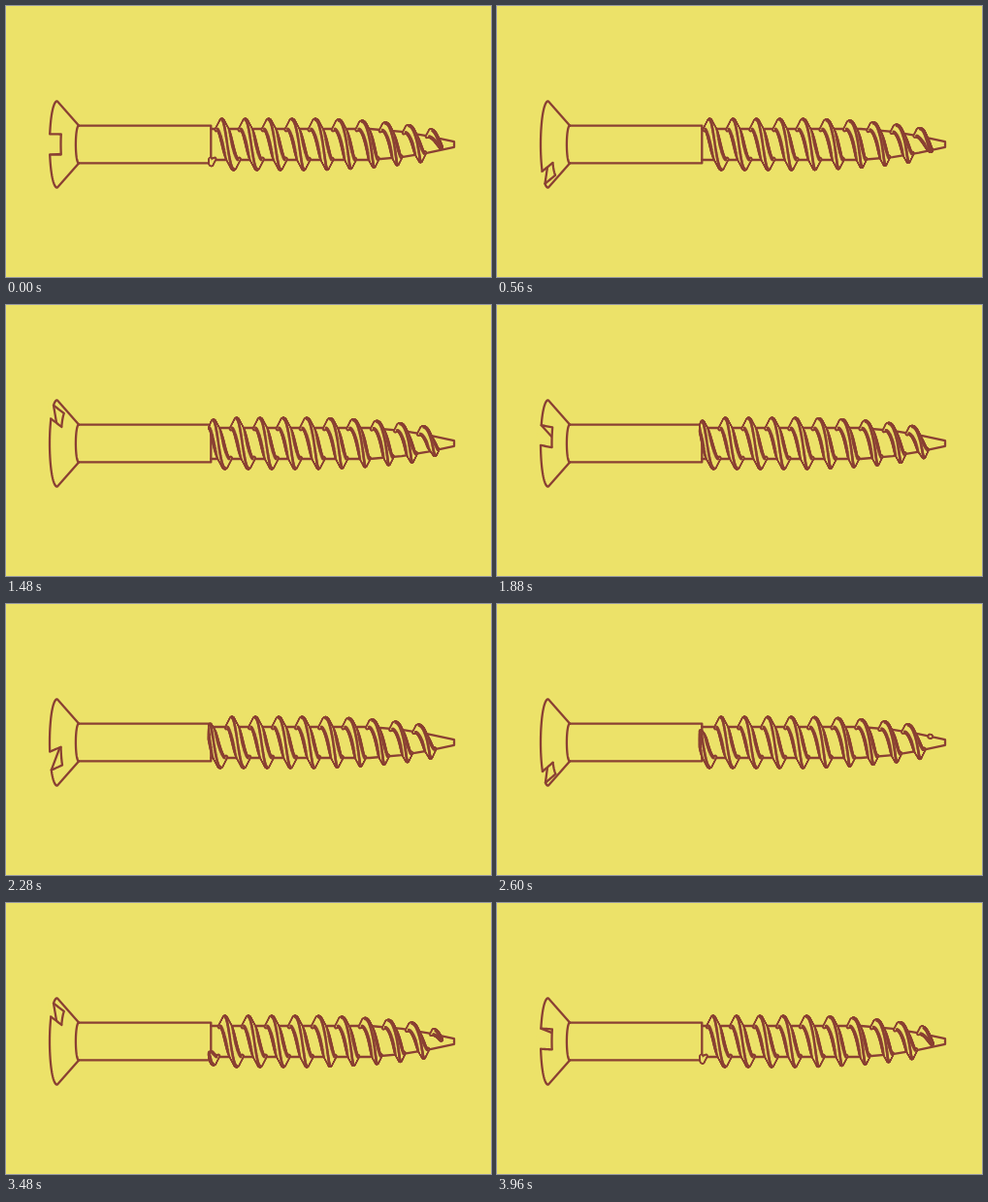
An HTML page with a canvas that plays this animation: 500x280 px, repeating every 4000 ms.

```html
<!DOCTYPE html>
<html lang="en">
<head>
<meta charset="utf-8">
<title>Turning screw</title>
<style>
  html, body { margin: 0; width: 100%; height: 100%; overflow: hidden; background: #ece269; }
  canvas { display: block; width: 500px; height: 280px; }
</style>
</head>
<body>
<canvas id="stage"></canvas>
<script>
const canvas = document.getElementById('stage');
const ctx = canvas.getContext('2d');
const ratio = window.devicePixelRatio || 1;
canvas.width = 500 * ratio;
canvas.height = 280 * ratio;
ctx.scale(ratio, ratio);
ctx.lineJoin = ctx.lineCap = 'round';

const PAPER = '#ece269', INK = '#8a4033', LINE = 2.3, THREAD_LINE = 2.6;
const LOOP = 4000, STEP = 40;
const CX = 250, CY = 143, DISTANCE = 1100;
const RIM = { x: 53, r: 44.6 }, NECK = { x: 75, r: 19.4 }, SHANK_END = 211.3;
const SLOT = { half: 10.2, floor: 62.3 };
const PITCH = 24.1, FIRST_CREST = 222.6, THREAD_START = 210.5;

// Radius along the axis, as [x, r] points.
const CORE = [[SHANK_END, 16], [375, 16], [408, 13.2], [435, 8.6], [462, 2.8]];
const CREST = [[208.5, 16], [212, 22.5], [219, 25.1], [320, 25.1], [343, 24.4],
  [367, 23.2], [391, 21.4], [415, 18.8], [438, 15.4], [448, 6], [462, 0]];

function lookup(table, x) {
  if (x <= table[0][0]) return table[0][1];
  for (let i = 1; i < table.length; i++) {
    const [x0, r0] = table[i - 1], [x1, r1] = table[i];
    if (x <= x1) return r0 + (r1 - r0) * (x - x0) / (x1 - x0);
  }
  return table[table.length - 1][1];
}

// y points down, z points at the viewer.
function project(x, y, z) {
  const s = 1 + z / DISTANCE;
  return [CX + (x - CX) * s, CY + y * s];
}

const around = (x, r, a) => project(x, -r * Math.cos(a), r * Math.sin(a));
const sample = (from, to, n, f) =>
  Array.from({ length: n + 1 }, (_, i) => f(from + (to - from) * i / n));

function trace(points, close) {
  ctx.beginPath();
  points.forEach(p => ctx.lineTo(p[0], p[1]));
  if (close) ctx.closePath();
}
function stroke(points, close = false, color = INK, width = LINE) {
  trace(points, close);
  ctx.strokeStyle = color;
  ctx.lineWidth = width;
  ctx.stroke();
}
function fill(points) {
  trace(points, true);
  ctx.fillStyle = PAPER;
  ctx.fill();
}

function drawBody() {
  const half = (x, r) => sample(0, Math.PI, 40, a => around(x, r, a));
  const rim = half(RIM.x, RIM.r), neck = half(NECK.x, NECK.r);
  stroke([neck[0], ...rim, neck[40]]);
  stroke(neck);
  const top = CY - NECK.r, bottom = CY + NECK.r;
  stroke([neck[0], [SHANK_END, top], [SHANK_END, bottom], neck[40]]);
  stroke([...CORE.map(([x, r]) => [x, CY - r]),
    ...CORE.map(([x, r]) => [x, CY + r]).reverse()]);
}

// One open end of the slot, at an angle measured downwards from the viewer.
function drawSlotEnd(angle) {
  const turn = Math.atan2(Math.sin(angle), Math.cos(angle));
  const side = turn < 0 ? -1 : 1, a = Math.abs(turn);
  if (a > 2) return;
  const { half, floor } = SLOT;
  const sin = Math.sin(a), cos = Math.cos(a);
  const at = (x, s, w) => project(x, side * (s * sin + w * cos), s * cos - w * sin);
  const reach = (x, w) => {
    const r = RIM.r - (x - RIM.x) * (RIM.r - NECK.r) / (NECK.x - RIM.x);
    return Math.sqrt(r * r - w * w);
  };
  const edge = w => sample(RIM.x, floor, 8, x => at(x, reach(x, w), w));
  const near = edge(-half), far = edge(half);
  const base = sample(-half, half, 8, w => at(floor, reach(floor, w), w));
  const opening = [...near, ...base, ...far.slice().reverse(),
    at(50, 50, half), at(50, 50, -half)];
  const outer = sample(floor, RIM.x - 3, 8, x =>
    at(x, reach(x, 0) + 1.5 + 4 * (floor - x) / (floor - RIM.x), 0));

  fill(opening);
  fill([...near, ...outer]);
  fill([...far, ...outer]);

  // The far wall shows only beyond the near edge.
  const c = near[0], d = near[8];
  const dx = (d[0] - c[0]) * 3, dy = (d[1] - c[1]) * 3;
  const p = [c[0] - dx, c[1] - dy], q = [d[0] + dx, d[1] + dy];
  ctx.save();
  trace([p, q, [q[0], q[1] + side * 150], [p[0], p[1] + side * 150]], true);
  ctx.clip();
  stroke([...base, ...far.slice().reverse()]);
  trace(opening, true);
  ctx.clip();
  const depth = reach(RIM.x, half);
  stroke([at(RIM.x, depth, half), at(RIM.x, -depth, half)]);
  ctx.restore();
  stroke(near);
}

// Cross-section of the thread: left root, crest, right root.
function section(start, a) {
  const x = start + PITCH * a / (2 * Math.PI);
  const height = lookup(CREST, x) - lookup(CORE, x);
  if (x < THREAD_START || height < 0.4) return null;
  const left = Math.max(x - height / 2, THREAD_START), right = x + height / 2;
  return [
    around(left, lookup(CORE, left), a),
    around(x, lookup(CREST, x), a),
    around(right, lookup(CORE, right), a)
  ];
}

function drawTurn(start) {
  const n = 44, angles = sample(-0.35, Math.PI + 0.35, n, a => a);
  const cuts = angles.map(a => section(start, a));
  const slices = [];
  for (let i = 0; i < n; i++) {
    const u = cuts[i], v = cuts[i + 1];
    if (!u || !v) continue;
    const mid = (angles[i] + angles[i + 1]) / 2;
    slices.push({
      u, v,
      front: mid > 0 && mid < Math.PI,
      depth: Math.sin(mid),
      flanks: [[u[0], u[1], v[1], v[0]], [u[1], u[2], v[2], v[1]]]
    });
  }
  slices.sort((s, t) => s.depth - t.depth);
  // Ink around the whole turn leaves its silhouette once the flanks are filled.
  slices.forEach(s => s.flanks.forEach(f => stroke(f, true, INK, 4.6)));
  slices.forEach(s => {
    s.flanks.forEach(f => {
      fill(f);
      stroke(f, true, PAPER, 0.6);
    });
    if (s.front) {
      s.u.forEach((point, i) => stroke([point, s.v[i]], false, INK, THREAD_LINE));
    }
  });
}

function draw(time) {
  const phase = Math.floor(time % LOOP / STEP) * STEP / LOOP;
  const angle = phase * 2 * Math.PI;
  ctx.fillStyle = PAPER;
  ctx.fillRect(0, 0, 500, 280);
  drawBody();
  drawSlotEnd(angle + Math.PI);
  drawSlotEnd(angle);
  for (let i = -1; i <= 10; i++) drawTurn(FIRST_CREST + PITCH * (i - phase));
}

const begin = performance.now();
function tick() {
  draw(performance.now() - begin);
  requestAnimationFrame(tick);
}
tick();
</script>
</body>
</html>
```
